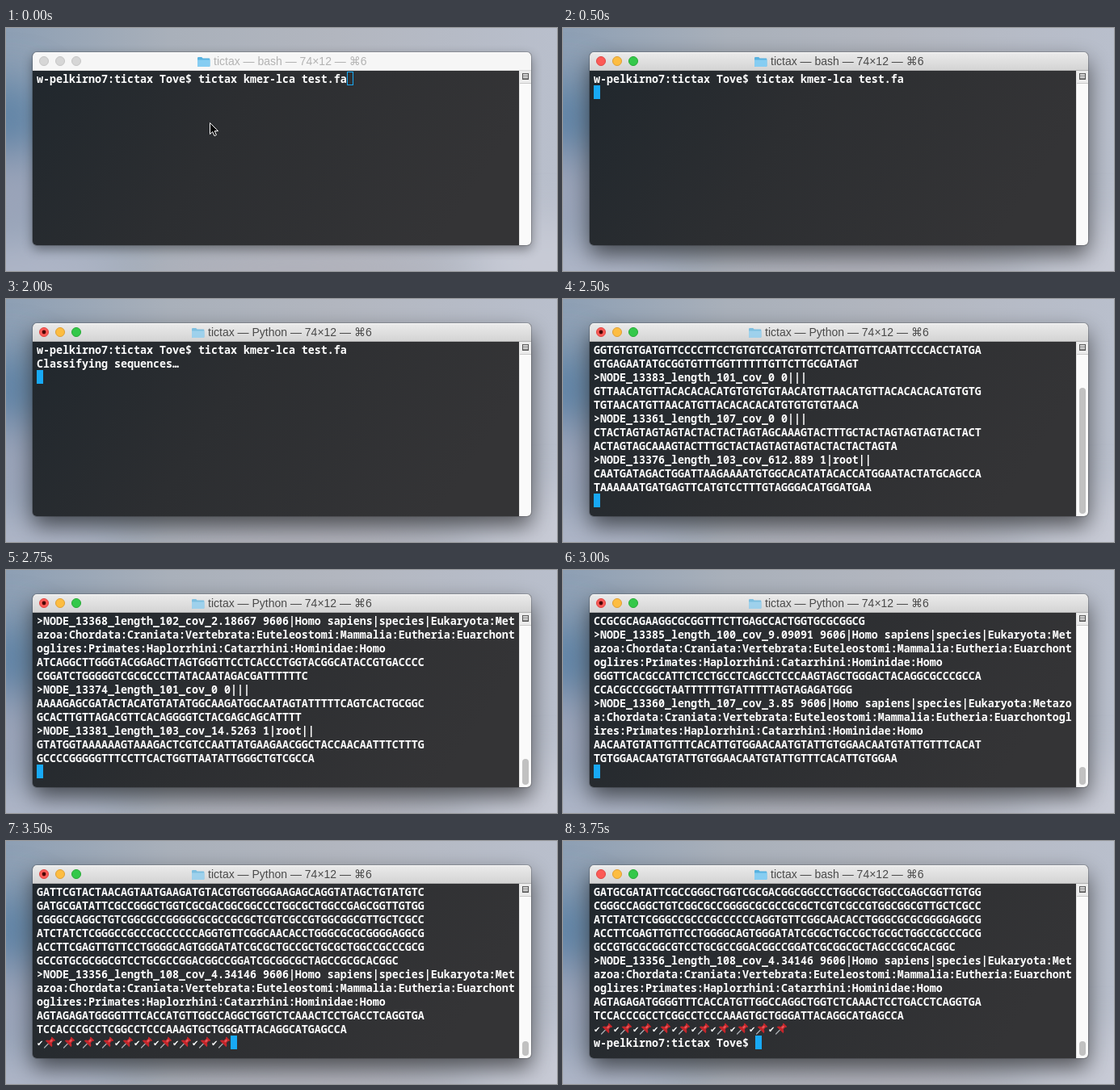
Animation of 682 by 301 pixels, one loop 4250 ms. Source, as an HTML page:

```html
<!DOCTYPE html>
<html lang="en">
<head>
<meta charset="utf-8">
<title>Terminal session</title>
<style>
  html, body { margin: 0; width: 100%; height: 100%; overflow: hidden; background: #b0b5c0; }
  svg { display: block; width: 682px; height: 301px; }
  .term { font: 600 13.3333px "Noto Sans Mono", "DejaVu Sans Mono", monospace; fill: #fff; white-space: pre; }
  .title { font: 14px "Liberation Sans", Arial, "DejaVu Sans", sans-serif; white-space: pre; }
  .tick { font: 10px "DejaVu Sans", sans-serif; fill: #fff; }
</style>
</head>
<body>
<svg viewBox="0 0 682 301" xmlns="http://www.w3.org/2000/svg">
  <defs>
    <linearGradient id="sky" x1="0" y1="0" x2="1" y2="0">
      <stop offset="0" stop-color="#8d9fb4"/>
      <stop offset=".3" stop-color="#a9b0ba"/>
      <stop offset=".6" stop-color="#b2b6bf"/>
      <stop offset="1" stop-color="#b9bfcc"/>
    </linearGradient>
    <linearGradient id="glass" x1="0" y1="0" x2="1" y2=".25">
      <stop offset="0" stop-color="#20272d"/>
      <stop offset=".45" stop-color="#2c2e31"/>
      <stop offset="1" stop-color="#343436"/>
    </linearGradient>
    <linearGradient id="bar" x1="0" y1="0" x2="0" y2="1">
      <stop offset="0" stop-color="#ebebeb"/>
      <stop offset="1" stop-color="#d3d3d3"/>
    </linearGradient>
    <filter id="soft" x="-100%" y="-100%" width="300%" height="300%"><feGaussianBlur stdDeviation="26"/></filter>
    <filter id="near" x="-20%" y="-30%" width="140%" height="160%"><feGaussianBlur stdDeviation="7"/></filter>
    <filter id="far" x="-20%" y="-40%" width="140%" height="180%"><feGaussianBlur stdDeviation="14"/></filter>
    <clipPath id="win"><rect x="33" y="30" width="617" height="239" rx="5"/></clipPath>
    <g id="pin">
      <path d="M6.2 9.2 1.6 14" stroke="#a9adb2" stroke-width="1.3" stroke-linecap="round"/>
      <path d="M2.6 5.2Q5 3.8 7.6 5L10 2.8Q9.6 1.4 10.8.6L15.2 5Q14.4 6.2 13 5.8L10.8 8.2Q12 10.8 10.6 13.2Z" fill="#c5262b"/>
      <path d="M8 6 10.6 3.6 12 5 9.6 7.6Z" fill="#e8585a"/>
    </g>
  </defs>

  <rect width="682" height="301" fill="url(#sky)"/>
  <g filter="url(#soft)">
    <ellipse cx="0" cy="112" rx="50" ry="48" fill="#5f83a6"/>
    <ellipse cx="0" cy="205" rx="60" ry="45" fill="#9ba4b9"/>
    <ellipse cx="20" cy="300" rx="130" ry="30" fill="#b5bacb"/>
    <ellipse cx="360" cy="310" rx="190" ry="28" fill="#b0b0ba"/>
    <ellipse cx="670" cy="290" rx="90" ry="50" fill="#c8cbd6"/>
  </g>
  <rect id="shadow" x="33" width="617" height="239" rx="5"/>

  <g clip-path="url(#win)">
    <rect x="33" y="30" width="617" height="239" fill="url(#glass)"/>
    <rect id="titlebar" x="33" y="30" width="617" height="23"/>
    <path d="M33 30.5H650" stroke="#fff" stroke-opacity=".6"/>
    <path id="edge" d="M33 52.5H650"/>
    <rect x="635" y="53" width="15" height="216" fill="#fafafa"/>
    <path d="M635.5 53V269" stroke="#e6e6e6"/>
    <rect x="636" y="53" width="14" height="15" fill="#ececec"/>
    <path d="M636 68.5H650" stroke="#c9c9c9"/>
    <rect x="639.5" y="56.5" width="7" height="7" fill="#fff" stroke="#555"/>
    <path d="M640 58.5H646M640 60.5H646M640 62.5H646" stroke="#777"/>
    <rect id="thumb" x="639" width="8" rx="4" fill="#c1c1c1"/>
  </g>
  <rect x="32.5" y="29.5" width="618" height="240" rx="5.5" fill="none" stroke="#000" stroke-opacity=".18"/>

  <g id="lights"></g>
  <circle id="busy" cx="47" cy="41" r="2.4" fill="#4a0503"/>
  <g id="folder">
    <path d="M0 3.2Q0 2 1.2 2H5.2L6.6 3.6H14.2Q15.4 3.6 15.4 4.8V13Q15.4 14 14.2 14H1.2Q0 14 0 13Z" fill="#58b2e0"/>
    <path d="M0 5.4H15.4V13Q15.4 14 14.2 14H1.2Q0 14 0 13Z" fill="#86cdf2"/>
  </g>
  <text id="title" class="title" y="46"></text>

  <g id="rows"></g>
  <g id="pins"></g>
  <rect id="caret"/>
  <path id="mouse" d="M252.5 117.5V131.5L255.7 128.5 258 133.6 260.4 132.5 258.2 127.6H262.5Z"
        fill="#000" stroke="#fff" stroke-linejoin="round"/>
</svg>

<script>
const LOOP = 4250, COLS = 74, CELL = 8, LEFT = 38, TOP = 54, ROW = 17;
const el = id => document.getElementById(id);
const set = (node, attrs) => { for (const k in attrs) node.setAttribute(k, attrs[k]); return node; };
const add = (parent, tag, attrs) =>
  parent.appendChild(set(document.createElementNS('http://www.w3.org/2000/svg', tag), attrs));

const prompt = 'w-pelkirno7:tictax Tove$ ';
const command = prompt + 'tictax kmer-lca test.fa';
const PINS = 'pins';

const node = (id, length, cov, taxon) => `>NODE_${id}_length_${length}_cov_${cov} ${taxon}`;
const human = '9606|Homo sapiens|species|Eukaryota:Metazoa:Chordata:Craniata:Vertebrata:' +
  'Euteleostomi:Mammalia:Eutheria:Euarchontoglires:Primates:Haplorrhini:Catarrhini:Hominidae:Homo';
const lacto = '1302250|Lactobacillus silagei JCM 19001|no rank|Bacteria:Firmicutes:Bacilli:' +
  'Lactobacillales:Lactobacillaceae:Lactobacillus';

// Seeded bases for reads that only flash past.
let seed = 7;
const bases = n => Array.from({ length: n }, () => {
  seed = (seed * 16807) % 2147483647;
  return 'ACGT'[Math.floor(seed / 2147483647 * 4)];
}).join('');

const wrap = lines => lines.flatMap(s => s.match(new RegExp(`.{1,${COLS}}`, 'g')));
const page = lines => wrap(lines).slice(-11);

const early = page([
  'GGTGTGTGATGTTCCCCTTCCTGTGTCCATGTGTTCTCATTGTTCAATTCCCACCTATGA',
  'GTGAGAATATGCGGTGTTTGGTTTTTTGTTCTTGCGATAGT',
  node(13383, 101, '0', '0|||'),
  'GTTAACATGTTACACACACATGTGTGTGTAACATGTTAACATGTTACACACACATGTGTG',
  'TGTAACATGTTAACATGTTACACACACATGTGTGTGTAACA',
  node(13361, 107, '0', '0|||'),
  'CTACTAGTAGTAGTACTACTACTAGTAGCAAAGTACTTTGCTACTAGTAGTAGTACTACT',
  'ACTAGTAGCAAAGTACTTTGCTACTAGTAGTAGTACTACTACTAGTA',
  node(13376, 103, '612.889', '1|root||'),
  'CAATGATAGACTGGATTAAGAAAATGTGGCACATATACACCATGGAATACTATGCAGCCA',
  'TAAAAAATGATGAGTTCATGTCCTTTGTAGGGACATGGATGAA'
]);
const passing = page([
  node(13368, 102, '2.18667', human), bases(60), bases(42),
  node(13374, 101, '0', '0|||'), bases(60), bases(41),
  node(13381, 103, '14.5263', '1|root||'), bases(60), bases(43)
]);
const primates = page([
  'CCGCGCAGAAGGCGCGGTTTCTTGAGCCACTGGTGCGCGGCG',
  node(13385, 100, '9.09091', human),
  'GGGTTCACGCCATTCTCCTGCCTCAGCCTCCCAAGTAGCTGGGACTACAGGCGCCCGCCA',
  'CCACGCCCGGCTAATTTTTTGTATTTTTAGTAGAGATGGG',
  node(13360, 107, '3.85', human),
  'AACAATGTATTGTTTCACATTGTGGAACAATGTATTGTGGAACAATGTATTGTTTCACAT',
  'TGTGGAACAATGTATTGTGGAACAATGTATTGTTTCACATTGTGGAA'
]);
const bacteria = page([
  node(13370, 106, '5.06329', human),
  'GTGAAACCCCGTCTCTACTAAAAATACAAAAAATTAGCCGGGCGTGGTGGCGGGCGCCTG',
  'TAGTCCCAGCTACTCAGGAGGCTGAGGCAGGAGAATGGCGTGAACC',
  node(13372, 104, '0.405405', lacto),
  'ACAGGGCCAGCTACCTGGCCCTGTACCGCGACGCGGTACAGGGCCAGCTACCTGGCCCTG',
  'TACCGCGACGCGGTACAGGGCCAGCTACCTGGCCCTGTACCGCG',
  node(13387, 100, '6660.21', '2759|Eukaryota|superkingdom|'),
  'AAATATCAAAGTACCCAAACTATACATTATATACTGTACATAAAATATGAAATTACATCA',
  'AATATATATTATATTAGGTACATAAAATATGAAAGTACAT'
]);
const last = page([
  'GATGCGATATTCGCCGGGCTGGTCGCGACGGCGGCCCTGGCGCTGGCCGAGCGGTTGTGG',
  'CGGGCCAGGCTGTCGGCGCCGGGGCGCGCCGCGCTCGTCGCCGTGGCGGCGTTGCTCGCC',
  'ATCTATCTCGGGCCGCCCGCCCCCCAGGTGTTCGGCAACACCTGGGCGCGCGGGGAGGCG',
  'ACCTTCGAGTTGTTCCTGGGGCAGTGGGATATCGCGCTGCCGCTGCGCTGGCCGCCCGCG',
  'GCCGTGCGCGGCGTCCTGCGCCGGACGGCCGGATCGCGGCGCTAGCCGCGCACGGC',
  node(13356, 108, '4.34146', human),
  'AGTAGAGATGGGGTTTCACCATGTTGGCCAGGCTGGTCTCAAACTCCTGACCTCAGGTGA',
  'TCCACCCGCCTCGGCCTCCCAAAGTGCTGGGATTACAGGCATGAGCCA',
  PINS
]);

// Each scene holds until the next one; caret is [column, row], thumb the scroller's top.
const scenes = [
  { at: 0, rows: [command], caret: [48, 0], idle: true, mouse: true },
  { at: 250, rows: [command], caret: [48, 0], idle: true },
  { at: 500, rows: [command], caret: [0, 1] },
  { at: 750, rows: [command], caret: [0, 1], busy: true },
  { at: 2000, rows: [command, 'Classifying sequences…'], caret: [0, 2], busy: true },
  { at: 2500, rows: early, caret: [0, 11], busy: true, thumb: 110 },
  { at: 2750, rows: passing, caret: [0, 11], busy: true, thumb: 234 },
  { at: 3000, rows: primates, caret: [0, 11], busy: true, thumb: 244 },
  { at: 3250, rows: bacteria, caret: [0, 11], busy: true, thumb: 248 },
  { at: 3500, rows: [bases(60), ...last], caret: [30, 11], busy: true, thumb: 248 },
  { at: 3750, rows: [...last, prompt], caret: [25, 11], thumb: 248 }
];

const lights = [['#fc5b57', '#df4744'], ['#fdbd41', '#de9f34'], ['#34c84a', '#27aa35']].map((hue, i) =>
  ({ hue, dot: add(el('lights'), 'circle', { cx: 47 + 20 * i, cy: 41, r: 5.5 }) }));
const rowTexts = Array.from({ length: 12 }, (_, i) =>
  add(el('rows'), 'text', { class: 'term', x: LEFT, y: TOP + ROW * i + 14 }));
for (let i = 0; i < 10; i++) {
  const x = LEFT + i * 3 * CELL;
  add(el('pins'), 'text', { class: 'tick', x, y: 13 }).textContent = '✔';
  add(el('pins'), 'use', { href: '#pin', x: x + CELL, y: 1 });
}

function draw(t) {
  const s = scenes.findLast(scene => scene.at <= t);
  const show = (id, on) => set(el(id), { visibility: on ? 'visible' : 'hidden' });

  set(el('shadow'), s.idle
    ? { y: 35, filter: 'url(#near)', opacity: .4 }
    : { y: 42, filter: 'url(#far)', opacity: .58 });
  set(el('titlebar'), { fill: s.idle ? '#f6f6f6' : 'url(#bar)' });
  set(el('edge'), { stroke: s.idle ? '#d9d9d9' : '#b1b1b1' });
  for (const { hue, dot } of lights) {
    set(dot, { fill: s.idle ? '#d6d6d6' : hue[0], stroke: s.idle ? '#c6c6c6' : hue[1] });
  }
  show('busy', s.busy);
  show('mouse', s.mouse);

  const x = s.busy ? 230 : 237;
  set(el('folder'), { transform: `translate(${x} 34)`, opacity: s.busy ? .72 : 1 });
  set(el('title'), { x: x + 20, fill: s.idle ? '#b3b3b3' : '#4a4a4a' })
    .textContent = `tictax — ${s.busy ? 'Python' : 'bash'} — 74×12 — ⌘6`;

  rowTexts.forEach((text, i) => {
    const row = s.rows[i] || '';
    text.textContent = row === PINS ? '' : row;
  });
  const pinRow = s.rows.indexOf(PINS);
  show('pins', pinRow >= 0);
  set(el('pins'), { transform: `translate(0 ${TOP + ROW * pinRow})` });

  const cx = LEFT + s.caret[0] * CELL, cy = TOP + s.caret[1] * ROW;
  set(el('caret'), s.idle
    ? { x: cx + .5, y: cy + .5, width: CELL - 1, height: ROW - 1, fill: 'none', stroke: '#18a9f5' }
    : { x: cx, y: cy, width: CELL, height: ROW, fill: '#18a9f5', stroke: 'none' });

  show('thumb', s.thumb);
  if (s.thumb) set(el('thumb'), { y: s.thumb, height: 266 - s.thumb });
}

const start = performance.now();
function tick() {
  draw((performance.now() - start) % LOOP);
  requestAnimationFrame(tick);
}
tick();
</script>
</body>
</html>
```
